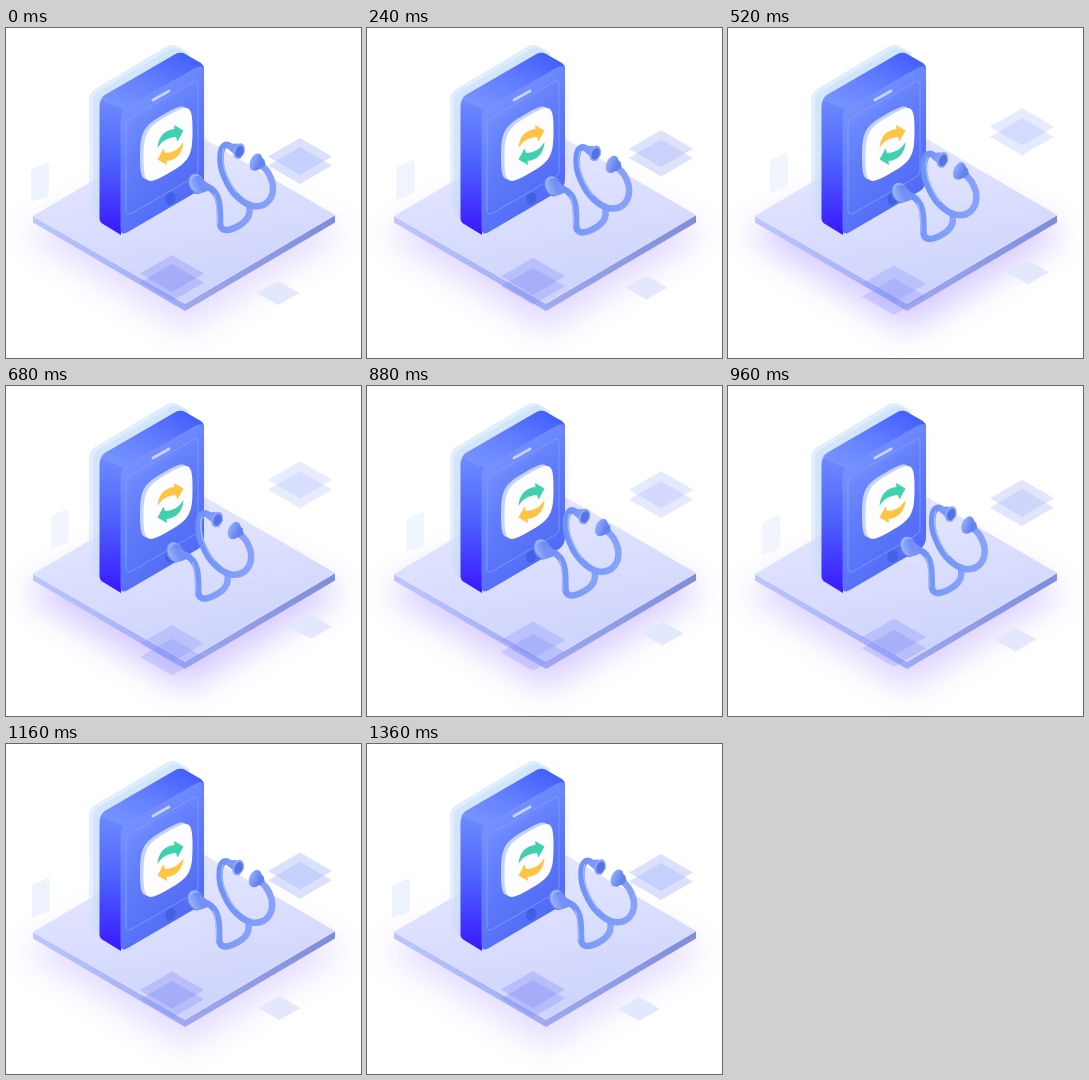
An HTML page that plays this animation: 355x330 px, repeating every 3.32 s.

```html
<!DOCTYPE html>
<html lang="en">
<head>
<meta charset="utf-8">
<title>Medical device</title>
<style>
html, body { margin: 0; width: 100%; height: 100%; overflow: hidden; background: #fff }
svg { display: block; width: 355px; height: 330px }
</style>
</head>
<body>
<svg viewBox="0 0 355 330">
  <defs>
    <filter id="blur" x="-30%" y="-30%" width="160%" height="160%"><feGaussianBlur stdDeviation="16"/></filter>
    <filter id="soft" x="-30%" y="-30%" width="160%" height="160%"><feGaussianBlur stdDeviation="2.5"/></filter>
    <linearGradient id="top" x1=".3" y1="0" x2=".6" y2="1">
      <stop stop-color="#e8e9fe"/><stop offset="1" stop-color="#ccd2fd"/>
    </linearGradient>
    <linearGradient id="edgeL"><stop stop-color="#bcc6fd"/><stop offset="1" stop-color="#9eaaf8"/></linearGradient>
    <linearGradient id="edgeR"><stop stop-color="#a0a9f0"/><stop offset="1" stop-color="#7f8cdc"/></linearGradient>
    <linearGradient id="body" x1="0" y1="0" x2="0" y2="1">
      <stop offset=".2" stop-color="#7391ff"/><stop offset=".6" stop-color="#4d62fd"/><stop offset="1" stop-color="#3a16ff"/>
    </linearGradient>
    <linearGradient id="roof" x1="0" y1="1" x2="1" y2="0">
      <stop stop-color="#7c99ff"/><stop offset=".5" stop-color="#627eff"/><stop offset="1" stop-color="#3c58fb"/>
    </linearGradient>
    <linearGradient id="face" x1="0" y1="0" x2=".5" y2="1">
      <stop stop-color="#86a1ff"/><stop offset=".5" stop-color="#6480fc"/><stop offset="1" stop-color="#4f69f6"/>
    </linearGradient>
    <linearGradient id="halo" x1="0" y1="0" x2="0" y2="1">
      <stop stop-color="#d3e8fb"/><stop offset="1" stop-color="#d5defc" stop-opacity=".6"/>
    </linearGradient>
    <linearGradient id="tube">
      <stop stop-color="#6f92f8"/><stop offset="1" stop-color="#88a2fb"/>
    </linearGradient>
    <linearGradient id="knob"><stop stop-color="#93adfe"/><stop offset="1" stop-color="#5c7cee"/></linearGradient>
    <path id="tile" d="M-1 0C-1-.88-.88-1 0-1S1-.88 1 0 .88 1 0 1-1 .88-1 0Z"/>
    <path id="arrow" d="M151.500 120C152 109 159 101.500 168.500 101L168 97 177.500 102.500 171.500 113.500 170 109C162 109.500 156 112.500 151.500 120Z"/>
    <path id="card" d="M-32 0 0-18.500 32 0 0 18.500Z"/>
  </defs>

  <path id="glow" d="M17 206 178 130 339 206 179 304Z" fill="#7d5cff" filter="url(#blur)"/>

  <!-- platform -->
  <path d="M27 188 179 275.500V283L27 194.500Z" fill="url(#edgeL)"/>
  <path d="M179 275.500 329 187V194.500L179 283Z" fill="url(#edgeR)"/>
  <path d="M27 188 178 99 329 187 179 275.500Z" fill="url(#top)"/>
  <path d="M27 188 179 275.500 329 187" fill="none" stroke="#dfe4ff" stroke-width=".8"/>

  <!-- device -->
  <path d="M83 72Q83 65 89 61L158 20Q165 15 171 18L184 25 113 90 94 192 83 184Z" fill="url(#halo)" opacity=".75"/>
  <path d="M87 74Q87 67 93 63L163 22Q169 18 175 22L184 27 113 90 94 192 87 188Z" fill="#c4defb" opacity=".5"/>
  <path d="M93.500 79Q93.500 71 99 67L168 27Q174 23 179 26L198 38 115 90V207L97 196Q93.500 194 93.500 190Z" fill="url(#body)"/>
  <path d="M95 72Q96 69 99 67L168 27Q174 23 179 26L195 35Q198.500 38 198 43L120 83Z" fill="url(#roof)"/>
  <path d="M114.500 91Q114.500 83 121 79L189 40Q198 35 198 44V151Q198 159 192 163L121 204.500Q114.500 208 114.500 200Z" fill="url(#face)"/>
  <path d="M120 97Q120 92 125 89L187 54Q192 51 192 57V143Q192 147 188 149L126 185Q120 188 120 182Z" fill="none" stroke="#8aa0ff" stroke-width=".8"/>
  <path d="M147 72 163 63" stroke="#c6d2ff" stroke-width="3" stroke-linecap="round"/>
  <ellipse cx="164.500" cy="170.500" rx="5" ry="6.500" transform="rotate(20 164.500 170.500)" fill="#4061e2"/>

  <!-- sync tile -->
  <use href="#tile" transform="matrix(24.5 -14 0 29 162 120)" fill="#3f58d8" opacity=".45" filter="url(#soft)"/>
  <use href="#tile" transform="matrix(24.5 -14 0 29 158.500 115)" fill="#c3d3fd"/>
  <use href="#tile" transform="matrix(24.5 -14 0 29 162 116.500)" fill="#fdfdff"/>
  <use id="upper" href="#arrow"/>
  <use id="lower" href="#arrow" transform="rotate(180 164.500 117)"/>

  <!-- floating cards -->
  <path id="left" d="M25 144Q25 141 28 140L41 134.500Q43 134 43 137V165Q43 168 40 169L25 174Z" fill="#eef4fe"/>
  <path id="small" d="M-21 0 0-12 21 0 0 12Z" fill="#e3e8fd"/>
  <g fill="#a9b7fa"><use id="p1" href="#card"/><use id="p2" href="#card"/></g>
  <g fill="#7c88f6" opacity=".3"><use id="b1" href="#card"/></g>
  <g fill="#7c88f6" opacity=".3"><use id="b2" href="#card"/></g>

  <!-- stethoscope -->
  <g id="scope">
    <g id="tubes" fill="none" stroke="url(#tube)" stroke-width="6.500" stroke-linecap="round" stroke-linejoin="round">
      <path d="M202 159C215 165 214 181 214 194C214 207 227 202 237 195C243 190 244 186 243.500 179"/>
      <path d="M223 117.500C213 113 212 136 219 150C226 167 238 176 247 178C262 180 269 168 266.500 155C264 146 261 142 255 137"/>
    </g>
    <path d="M218 120C214 132 219 150 231 165M208 166C212 174 211 188 212 196" fill="none" stroke="#a6bcff" stroke-width="1.200"/>
    <ellipse cx="189.500" cy="156" rx="7.500" ry="10.500" transform="rotate(-24 189.500 156)" fill="#5f7df0"/>
    <ellipse cx="191" cy="155.500" rx="7.500" ry="10" transform="rotate(-24 191 155.500)" fill="#9ab2ff"/>
    <ellipse cx="192.500" cy="156.500" rx="7" ry="9" transform="rotate(-24 192.500 156.500)" fill="url(#knob)"/>
    <path d="M194 149.500 204 157 201.500 163 196 165Z" fill="#7390f6"/>
    <path d="M221 116 231 115.500 239 124 234 131 222 121Z" fill="#7b99fa"/>
    <ellipse cx="233" cy="123" rx="5.500" ry="8" transform="rotate(20 233 123)" fill="#89a4fc"/>
    <ellipse cx="233.500" cy="123.500" rx="3.900" ry="6" transform="rotate(20 233.500 123.500)" fill="#5574e4"/>
    <path d="M251 125.500 258.500 132 259.500 137 256 140 249 143Z" fill="#6483f1"/>
    <ellipse cx="250" cy="134" rx="5.800" ry="9" transform="rotate(24 250 134)" fill="url(#knob)"/>
  </g>
</svg>
<script>
const LOOP = 3320, STEP = 40, MOVE = 560, OUT = 160, BACK = 720;
const GREEN = '#3fd0ae', YELLOW = '#ffc443';
const el = id => document.getElementById(id);
const clamp = x => Math.min(1, Math.max(0, x));
const move = (id, x, y) => el(id).setAttribute('transform', `translate(${x} ${y})`);
const fade = (value, ...ids) => ids.forEach(id => el(id).setAttribute('opacity', value));

// 0 = at rest, 1 = scope against the device
function progress(t) {
  if (t < BACK) return Math.sin(clamp((t - OUT) / MOVE) * Math.PI / 2);
  return (1 - clamp((t - BACK) / MOVE) ** 1.8) ** 3.1;
}

function draw() {
  const t = Math.floor(performance.now() % LOOP / STEP) * STEP;
  const p = progress(t);
  const swapped = t >= 200 && t < 760;
  el('upper').setAttribute('fill', swapped ? YELLOW : GREEN);
  el('lower').setAttribute('fill', swapped ? GREEN : YELLOW);
  move('scope', -22 * p, 10.5 * p);
  move('left', 20 * p, -11.5 * p);
  move('small', 272 + 33 * p, 265 - 24.5 * p);
  move('p1', 294, 128.5 - 35 * p);
  move('p2', 294, 137.5 - 34 * p);
  move('b1', 166, 245.5 + 12 * p);
  move('b2', 166, 254.5 + 16.5 * p);
  fade(0.42 - 0.16 * p, 'p1', 'p2');
  fade(1 - 0.2 * p, 'b1', 'b2', 'left');
  fade(0.2 + 0.12 * p, 'glow');
  requestAnimationFrame(draw);
}
draw();
</script>
</body>
</html>
```
